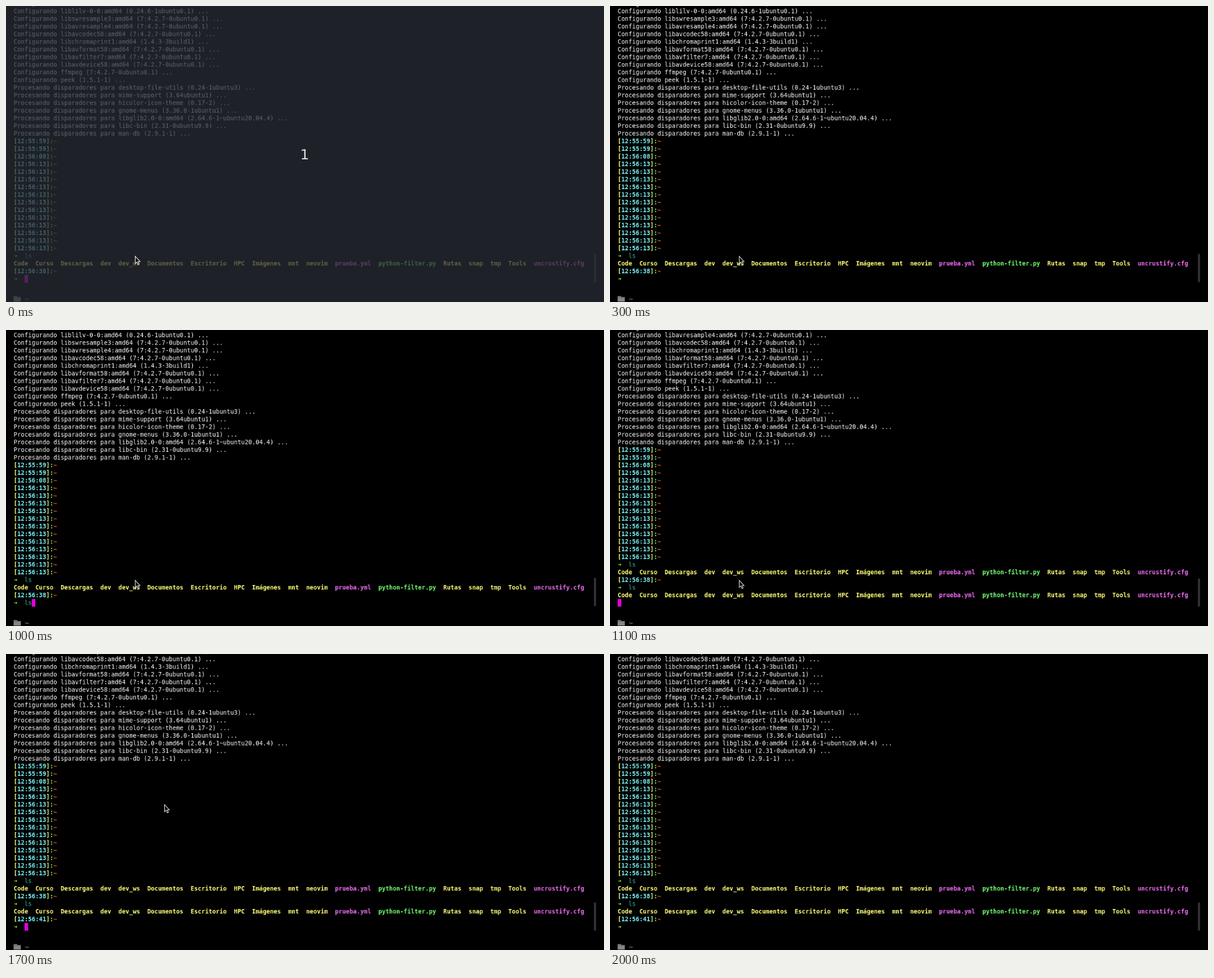
An HTML page with a canvas that plays this animation: 1062x527 px, repeating every 2.3 s.

```html
<!DOCTYPE html>
<html lang="es">
<head>
<meta charset="utf-8">
<title>Terminal</title>
<style>
  html, body { margin: 0; width: 100%; height: 100%; overflow: hidden; background: #000; }
  canvas { display: block; }
</style>
</head>
<body>
<canvas id="stage" width="1062" height="527"></canvas>
<script>
const LOOP = 2300, WIDTH = 1062, HEIGHT = 527;
const CELL_W = 8, CELL_H = 17, LEFT = 17, TOP = 3, ASCENT = 13, LAST_ROW = 35;
const WHITE = '#fff', YELLOW = '#ffff78', CYAN = '#7dfbff', GREEN = '#74ff74',
      LIME = '#87ff1a', ORANGE = '#ff5a1c', PINK = '#ee6cf2', TEAL = '#31b9a8', BLOCK = '#e400e0';

const stage = document.getElementById('stage').getContext('2d');

// The terminal is drawn on whole-pixel cells, then scaled down to the stage.
const screen = document.createElement('canvas');
screen.width = 1325;
screen.height = 658;
const term = screen.getContext('2d');

// A line is a list of spans: [text, colour, bold].
const plain = text => [[text, WHITE]];
const clock = time => [['[', YELLOW, true], [time, CYAN, true], [']', YELLOW, true],
                       [':', GREEN, true], ['~', ORANGE, true]];
const prompt = command => [['➜', LIME, true], ['  ' + command, TEAL]];

const fileColor = name => /\.(yml|cfg)$/.test(name) ? PINK : name.endsWith('.py') ? GREEN : YELLOW;
const listing = ('Code Curso Descargas dev dev_ws Documentos Escritorio HPC Imágenes mnt neovim ' +
  'prueba.yml python-filter.py Rutas snap tmp Tools uncrustify.cfg')
  .split(' ').map(name => [name + '  ', fileColor(name), true]);

const configured = [
  'libsratom-0-0:amd64 (0.6.4-1)', 'liblilv-0-0:amd64 (0.24.6-1ubuntu0.1)',
  ...['libswresample3', 'libavresample4', 'libavcodec58'].map(lib => lib + ':amd64 (7:4.2.7-0ubuntu0.1)'),
  'libchromaprint1:amd64 (1.4.3-3build1)',
  ...['libavformat58', 'libavfilter7', 'libavdevice58'].map(lib => lib + ':amd64 (7:4.2.7-0ubuntu0.1)'),
  'ffmpeg (7:4.2.7-0ubuntu0.1)', 'peek (1.5.1-1)'
];
const triggers = [
  'desktop-file-utils (0.24-1ubuntu3)', 'mime-support (3.64ubuntu1)', 'hicolor-icon-theme (0.17-2)',
  'gnome-menus (3.36.0-1ubuntu1)', 'libglib2.0-0:amd64 (2.64.6-1~ubuntu20.04.4)',
  'libc-bin (2.31-0ubuntu9.9)', 'man-db (2.9.1-1)'
];
const history = [
  ...configured.map(item => plain(`Configurando ${item} ...`)),
  ...triggers.map(item => plain(`Procesando disparadores para ${item} ...`)),
  ...['12:55:59', '12:55:59', '12:56:08', ...Array(12).fill('12:56:13')].map(clock),
  prompt('ls'), listing, clock('12:56:38')
];

function terminalLines(t) {
  if (t < 900) return [...history, prompt('')];
  if (t < 1000) return [...history, prompt('l')];
  if (t < 1100) return [...history, prompt('ls')];
  const done = [...history, prompt('ls'), listing];
  return t < 1200 ? [...done, []] : [...done, clock('12:56:41'), prompt('')];
}

function pointerAt(t) {
  if (t < 1700) return [229, 445];
  if (t < 1800) return [281, 267.5];
  if (t < 1900) return [276, 110];
  return t < 2000 ? [270, 16.5] : null;
}

const blockVisible = t => t < 300 || (t >= 900 && t < 1800);

function drawLine(line, row) {
  let col = 0;
  for (const [text, color, bold] of line) {
    term.font = `${bold ? 'bold ' : ''}13.333px "DejaVu Sans Mono", monospace`;
    term.fillStyle = color;
    for (const char of text) {
      term.fillText(char, LEFT + CELL_W * col++, TOP + CELL_H * row + ASCENT);
    }
  }
  return col;
}

function drawTerminal(t) {
  term.fillStyle = '#000';
  term.fillRect(0, 0, screen.width, screen.height);
  const lines = terminalLines(t);
  let col = 0;
  lines.forEach((line, i) => {
    const row = LAST_ROW - lines.length + 1 + i;
    if (row >= -1) col = drawLine(line, row);
  });
  if (blockVisible(t)) {
    term.fillStyle = BLOCK;
    term.fillRect(LEFT + CELL_W * col, TOP + CELL_H * LAST_ROW, CELL_W, CELL_H);
  }
  stage.imageSmoothingQuality = 'low';
  stage.drawImage(screen, 0, 0, WIDTH, HEIGHT);
}

function drawChrome(t) {
  stage.fillStyle = '#303030';
  stage.fillRect(1044, t < 1100 ? 441.5 : 442.5, 4, 50);
  stage.fillStyle = '#858585';
  stage.fill(new Path2D('M13.5 516.5H19.5L20.5 518H26.3V526.3H13.5Z'));
  stage.fillStyle = '#4a4a4a';
  stage.fillRect(14.5, 518.3, 11, 0.8);
  stage.fillStyle = '#999';
  stage.font = '10.667px "DejaVu Sans", sans-serif';
  stage.fillText('~', 32.8, 525.5);
}

function drawCountdown() {
  stage.fillStyle = 'rgba(40, 44, 52, 0.75)';
  stage.fillRect(0, 0, WIDTH, HEIGHT);
  stage.fillStyle = '#dcdcdc';
  stage.font = '25px "DejaVu Sans", sans-serif';
  stage.textAlign = 'center';
  stage.fillText('1', 530.5, 273);
  stage.textAlign = 'left';
}

const arrow = new Path2D('M.5 .7V13.3L3.4 10.8L5.4 15.2L7.5 14.2L5.5 10H9.1Z');
function drawPointer([x, y], color) {
  stage.save();
  stage.translate(x, y);
  stage.fillStyle = '#111';
  stage.fill(arrow);
  stage.strokeStyle = color;
  stage.lineWidth = 1.1;
  stage.stroke(arrow);
  stage.restore();
}

function draw(t) {
  drawTerminal(t);
  drawChrome(t);
  if (t < 100) drawCountdown();
  const pointer = pointerAt(t);
  if (pointer) drawPointer(pointer, t < 100 ? '#f4f4f4' : '#d8d8d8');
}

let start, shown = -1;
function tick(now) {
  start ??= now;
  const step = Math.floor((now - start) % LOOP / 100) * 100;
  if (step !== shown) draw(shown = step);
  requestAnimationFrame(tick);
}
draw(0);
requestAnimationFrame(tick);
</script>
</body>
</html>
```
